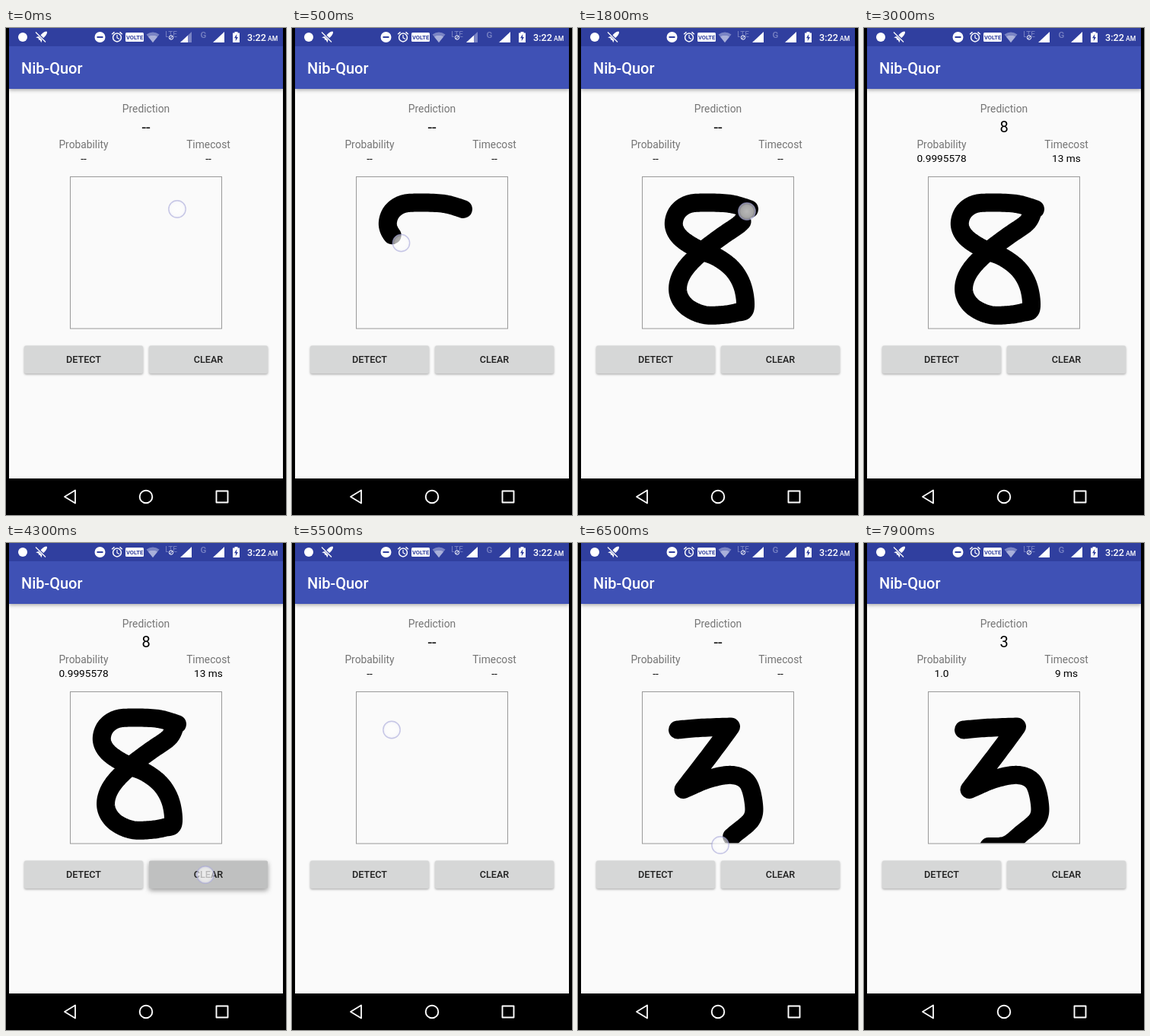
An HTML page with a canvas for the animation above (8000 ms loop, 368 by 640 pixels).

```html
<!DOCTYPE html>
<html lang="en">
<head>
<meta charset="utf-8">
<title>Digit recognizer</title>
<style>
  html, body { margin: 0; width: 100%; height: 100%; overflow: hidden; background: #000; }
  canvas { display: block; width: 368px; height: 640px; }
</style>
</head>
<body>
<canvas id="stage" width="368" height="640"></canvas>
<script>
const LOOP = 8000, STEP = 100, INK_LAG = 50;
const ctx = document.getElementById('stage').getContext('2d');
const FONT = 'Roboto, "Noto Sans", sans-serif';

// Smooth path through points; a repeated point makes a sharp corner.
// marks: [point index, time] pairs, constant speed in between.
function makeStroke(pts, marks) {
  const path = [{ x: pts[0][0], y: pts[0][1], len: 0, u: 0 }];
  for (let i = 0; i < pts.length - 1; i++) {
    const b = pts[i], c = pts[i + 1];
    if (b[0] === c[0] && b[1] === c[1]) continue;
    const a = pts[i - 1] || b, d = pts[i + 2] || c;
    for (let k = 1; k <= 12; k++) {
      const s = k / 12;
      const at = n => b[n] + 0.5 * s * (c[n] - a[n] +
        s * (2 * a[n] - 5 * b[n] + 4 * c[n] - d[n] +
        s * (3 * (b[n] - c[n]) + d[n] - a[n])));
      const last = path[path.length - 1], x = at(0), y = at(1);
      path.push({ x, y, len: last.len + Math.hypot(x - last.x, y - last.y), u: i + s });
    }
  }
  const lenAt = u => path.find(p => p.u >= u - 1e-6).len;
  for (const p of path) {
    let m = 0;
    while (m < marks.length - 2 && p.u > marks[m + 1][0]) m++;
    const [u0, t0] = marks[m], [u1, t1] = marks[m + 1];
    const l0 = lenAt(u0);
    p.t = t0 + (t1 - t0) * (p.len - l0) / (lenAt(u1) - l0);
  }
  return path;
}

const eight = makeStroke([
  [225, 238], [200, 231], [165, 229.5], [144, 232], [130, 243], [126, 260],
  [135, 276], [158, 291], [184, 302], [205, 319], [217, 342], [219.5, 369],
  [208, 374], [190, 377], [166, 377], [145, 368], [133, 353], [132, 335],
  [142, 315], [165, 292], [190, 273], [214, 256], [222, 241]
], [[0, 30], [11, 900], [12, 1000], [22, 1800]]);

const three = makeStroke([
  [131, 245.5], [160, 243], [201, 241.5], [201, 241.5], [174, 278], [138.5, 324],
  [138.5, 324], [172, 310], [203, 305], [223, 315], [231, 343], [228, 363],
  [208, 381], [187, 397], [164, 399]
], [[0, 5520], [13, 6500], [14, 6650]]);

function posAt(path, t) {
  const i = path.findIndex(p => p.t > t);
  if (i < 0) return path[path.length - 1];
  if (i === 0) return path[0];
  const a = path[i - 1], b = path[i], f = (t - a.t) / (b.t - a.t);
  return { x: a.x + (b.x - a.x) * f, y: a.y + (b.y - a.y) * f };
}

function rect(x, y, w, h, fill) {
  ctx.fillStyle = fill;
  ctx.fillRect(x, y, w, h);
}

function text(str, x, y, size, color, weight = 400, align = 'center') {
  ctx.font = `${weight} ${size}px ${FONT}`;
  ctx.fillStyle = color;
  ctx.textAlign = align;
  ctx.fillText(str, x, y);
}

function poly(pts, fill) {
  ctx.beginPath();
  pts.forEach(([x, y]) => ctx.lineTo(x, y));
  ctx.closePath();
  if (fill) {
    ctx.fillStyle = fill;
    ctx.fill();
  } else ctx.stroke();
}

function line(pts, color, width) {
  ctx.strokeStyle = color;
  ctx.lineWidth = width;
  ctx.beginPath();
  pts.forEach(([x, y]) => ctx.lineTo(x, y));
  ctx.stroke();
}

function disc(x, y, r, fill) {
  ctx.beginPath();
  ctx.arc(x, y, r, 0, 7);
  ctx.fillStyle = fill;
  ctx.fill();
}

function ring(x, y, r, color, width) {
  ctx.beginPath();
  ctx.arc(x, y, r, 0, 7);
  ctx.strokeStyle = color;
  ctx.lineWidth = width;
  ctx.stroke();
}

function statusBar(t) {
  const bg = '#303f9f', dim = '#7a84c4', white = '#fff';
  rect(4, 0, 360, 24, bg);
  disc(22, 12, 6, white);

  // crossed-out rocket
  ctx.save();
  ctx.translate(47, 11.5);
  ctx.rotate(Math.PI / 4);
  ctx.beginPath();
  ctx.ellipse(0, -2, 2.7, 7.5, 0, 0, 7);
  ctx.fillStyle = white;
  ctx.fill();
  poly([[-5, 6], [-2, 0], [2, 0], [5, 6], [0, 4]], white);
  ctx.restore();
  line([[39, 5], [53, 19]], bg, 3);
  line([[39, 5.5], [52, 18.5]], white, 1.3);

  disc(123.5, 12, 7, white);
  rect(119.5, 11, 8, 2, bg);

  ring(146, 12.5, 5.4, white, 1.5);
  line([[146, 9], [146, 13], [149, 14.5]], white, 1.2);
  line([[139.2, 8.2], [142.5, 5.4]], white, 1.5);
  line([[149.5, 5.4], [152.8, 8.2]], white, 1.5);

  ctx.beginPath();
  ctx.roundRect(157, 6, 24, 12, 1.5);
  ctx.fillStyle = white;
  ctx.fill();
  text('VOLTE', 169, 15, 7.5, bg, 700);

  ctx.beginPath();
  ctx.moveTo(193, 19);
  ctx.lineTo(184.5, 8.5);
  ctx.quadraticCurveTo(193, 2.5, 201.5, 8.5);
  ctx.closePath();
  ctx.fillStyle = dim;
  ctx.fill();
  poly([[193, 19], [187, 11.5], [190, 10], [196, 10], [199, 11.5]], '#a9b0da');

  text('LTE', 217, 12, 10, dim);
  disc(217, 12.5, 4, bg);
  ring(217, 12.5, 2.7, white, 1);
  line([[215.3, 14.2], [218.7, 10.8]], white, 1);
  poly([[229, 19], [244, 19], [244, 5]], t < 1400 ? dim : white);
  if (t < 1400) poly([[229, 19], [239, 19], [239, 9.7]], white);

  text('G', 259.5, 13, 11.5, dim, 500);
  poly([[272, 19], [287, 19], [287, 5]], white);

  rect(298, 6.5, 9, 12.5, white);
  rect(300.5, 5, 4, 2, white);
  poly([[303.3, 8], [300, 13.3], [302, 13.3], [301.7, 17.3], [305, 12], [303, 12]], bg);
  text('3:22', 317, 17, 12.6, white, 500, 'left');
  text('AM', 344, 17, 8.6, white, 500, 'left');
}

function navBar() {
  rect(0, 592, 368, 48, '#000');
  ctx.strokeStyle = '#fff';
  ctx.lineWidth = 1.8;
  ctx.lineJoin = 'round';
  poly([[77, 616], [91, 607.5], [91, 624.5]]);
  ring(184, 616, 8.3, '#fff', 1.9);
  ctx.strokeRect(276.5, 608.5, 15, 15);
}

function button(label, x, press) {
  ctx.save();
  ctx.shadowColor = `rgba(0,0,0,${0.32 + 0.1 * press})`;
  ctx.shadowBlur = 3 + 4 * press;
  ctx.shadowOffsetY = 1.3 + 1.5 * press;
  ctx.beginPath();
  ctx.roundRect(x, 417.5, 156, 36.5, 2);
  ctx.fillStyle = '#d6d7d7';
  ctx.fill();
  ctx.restore();
  if (press) {
    ctx.fillStyle = `rgba(0,0,0,${0.13 * press})`;
    ctx.fill();
  }
  text(label, x + 78, 440.3, 12.6, '#1f1f1f', 500);
}

function touch(x, y, alpha = 1) {
  ctx.save();
  ctx.globalAlpha = alpha;
  const g = ctx.createRadialGradient(x, y, 0, x, y, 11.5);
  g.addColorStop(0, 'rgba(255,255,255,.72)');
  g.addColorStop(0.7, 'rgba(252,252,252,.66)');
  g.addColorStop(1, 'rgba(235,235,250,.5)');
  disc(x, y, 11.3, g);
  ring(x, y, 11.2, 'rgba(165,165,215,.6)', 1.4);
  ctx.restore();
}

function ink(path, t) {
  if (t <= path[0].t) return;
  const end = posAt(path, t);
  ctx.save();
  ctx.beginPath();
  ctx.rect(85, 196, 198, 198.5);
  ctx.clip();
  ctx.lineCap = ctx.lineJoin = 'round';
  line([...path.filter(p => p.t <= t), end].map(p => [p.x, p.y]), '#000', 24);
  ctx.restore();
}

// Button highlight: held briefly, then fading out.
function pressed(t, start) {
  const d = t - start;
  if (d < 0 || d >= 500) return 0;
  return d < 200 ? 0.6 + d / 500 : 1 - (d - 200) / 300;
}

function drag(path, t, from, lift) {
  if (t < from || t > lift) return;
  const p = posAt(path, t);
  touch(p.x, p.y, t === lift ? 0.5 : 1);
}

function tap(x, t, start) {
  if (t >= start && t < start + 200) touch(x, 436, 1);
}

function resultAt(t) {
  if (t >= 2600 && t < 4400) return ['8', '0.9995578', '13 ms'];
  if (t >= 7600) return ['3', '1.0', '9 ms'];
  return ['--', '--', '--'];
}

function draw(t) {
  rect(0, 0, 368, 640, '#000');
  rect(4, 24, 360, 568, '#fafafa');

  ctx.save();
  ctx.shadowColor = 'rgba(0,0,0,.35)';
  ctx.shadowBlur = 5;
  ctx.shadowOffsetY = 1.5;
  rect(4, 24, 360, 56, '#3f51b5');
  ctx.restore();
  rect(0, 0, 4, 640, '#000');
  rect(364, 0, 4, 640, '#000');
  statusBar(t);
  text('Nib-Quor', 20, 60, 20, '#fff', 500, 'left');

  const [digit, prob, cost] = resultAt(t), grey = '#757575';
  text('Prediction', 184, 111, 13.8, grey);
  text(digit, 184, 137, 20, '#000');
  text('Probability', 102, 157.5, 13.8, grey);
  text(prob, 102, 176, 13.7, '#000');
  text('Timecost', 266, 157.5, 13.8, grey);
  text(cost, 266, 176, 13.7, '#000');

  if (t < 4400) ink(eight, t - INK_LAG);
  else ink(three, t - INK_LAG);
  ctx.strokeStyle = '#999';
  ctx.lineWidth = 1;
  ctx.lineJoin = 'miter';
  ctx.strokeRect(84.5, 195.5, 199, 199.5);

  button('DETECT', 24, pressed(t, 2400) || pressed(t, 7400));
  button('CLEAR', 188, pressed(t, 4200));
  navBar();

  drag(eight, t, 0, 1900);
  drag(three, t, 5500, 6800);
  tap(104, t, 2400);
  tap(262, t, 4200);
  tap(104, t, 7500);
}

function tick(now) {
  draw(Math.floor(now % LOOP / STEP) * STEP);
  requestAnimationFrame(tick);
}
draw(0);
requestAnimationFrame(tick);
</script>
</body>
</html>
```
